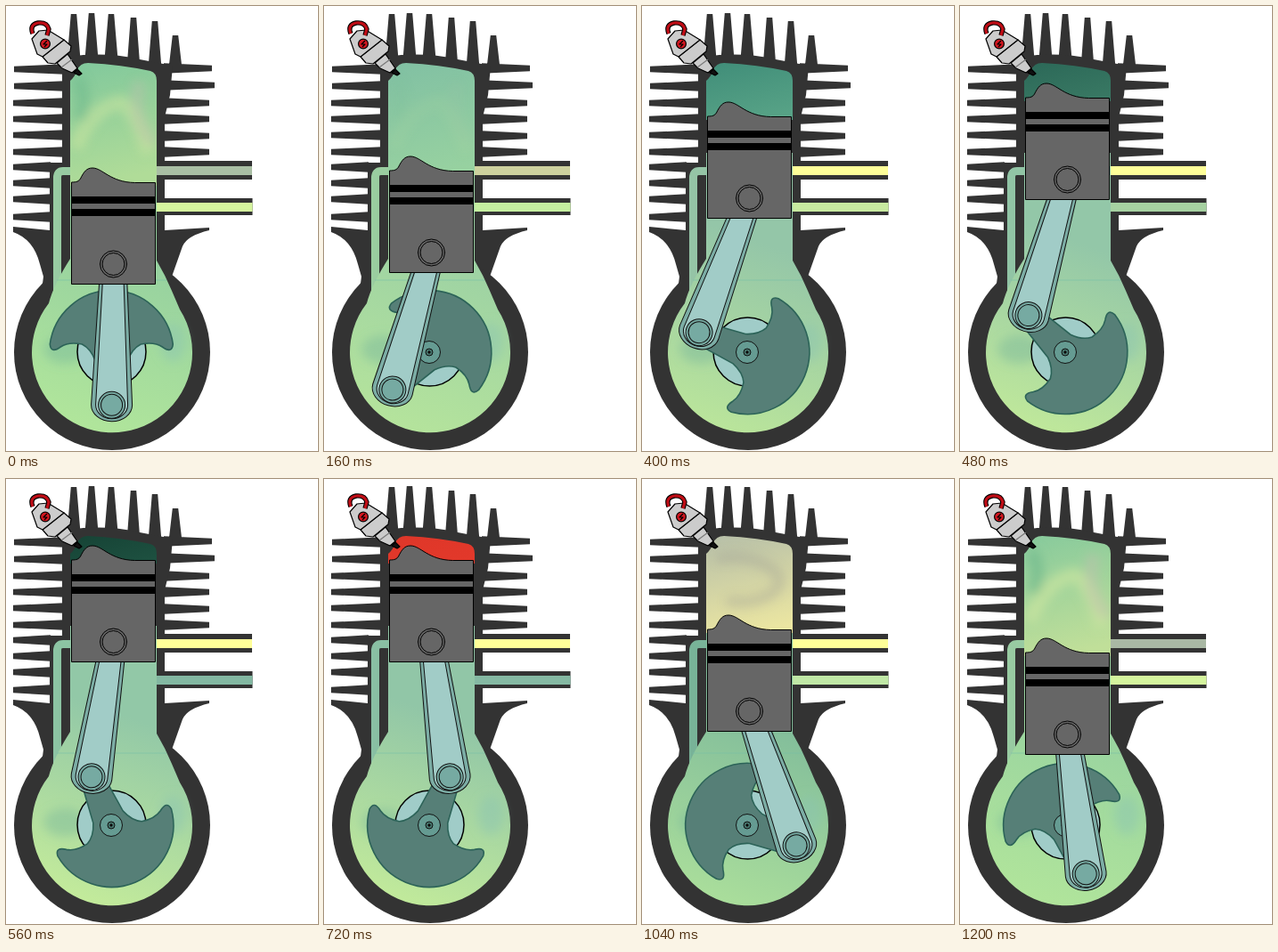
An HTML page that plays this animation: 350 by 500 pixels, repeating every 1280 ms.

```html
<!DOCTYPE html>
<html lang="en">
<head>
<meta charset="utf-8">
<title>Two-stroke engine</title>
<style>
html, body { margin: 0; width: 100%; height: 100%; overflow: hidden; background: #fff; }
svg { display: block; width: 350px; height: 500px; }
</style>
</head>
<body>
<svg viewBox="0 0 350 500" xmlns="http://www.w3.org/2000/svg">
  <defs>
    <linearGradient id="chamberFill" gradientUnits="userSpaceOnUse" x1="95" y1="65" x2="125" y2="195">
      <stop/><stop offset="1"/>
    </linearGradient>
    <linearGradient id="caseFill" gradientUnits="userSpaceOnUse" x1="145" y1="270" x2="75" y2="465">
      <stop/><stop offset="1"/>
    </linearGradient>
    <filter id="soft" x="-50%" y="-50%" width="200%" height="200%"><feGaussianBlur stdDeviation="6"/></filter>
    <clipPath id="chamberClip"><path id="chamberShape"/></clipPath>
  </defs>

  <g fill="#333">
    <path id="fins"/>
    <path d="M63 66L71 57Q110 51 150 60L187 67L184 100L178 125V252L228 249V252Q203 258 198 270L186 304L190 320H40L42 304L38 290Q31 262 8 254V248L49 252V176H63Z"/>
    <circle cx="119" cy="389" r="110"/>
    <path d="M168 174H276V195H168ZM168 216H276.5V235H168Z"/>
  </g>

  <path id="exhaust" d="M167 180H276V190H167Z"/>
  <path id="intake" d="M167 221H276.5V231H167Z"/>
  <path id="channel" d="M74 185.5H64Q57.5 185.5 57.5 193V320" fill="none" stroke-width="9"/>
  <path fill="url(#caseFill)" d="M72 165H169V286Q179 303 186 320L195 341A90 90 0 1 1 48 334Q53 314 72 284Z"/>
  <path d="M57 308H180" stroke="#76bfa8" opacity=".6"/>
  <g filter="url(#soft)">
    <ellipse cx="66" cy="386" rx="24" ry="16" fill="#65a898" opacity=".32"/>
    <ellipse cx="187" cy="378" rx="14" ry="22" fill="#8bc4b4" opacity=".45"/>
  </g>

  <g clip-path="url(#chamberClip)">
    <rect x="72" y="60" width="98" height="170" fill="url(#chamberFill)"/>
    <g id="wisps" filter="url(#soft)" fill="none">
      <path d="M78 160Q95 115 128 108Q145 115 160 165" stroke="#d0e8a0" stroke-width="16" opacity=".6"/>
      <path d="M150 85Q140 125 165 155" stroke="#c2c0b0" stroke-width="14" opacity=".5"/>
      <path d="M80 82Q92 100 82 128" stroke="#69b68b" stroke-width="14" opacity=".6"/>
    </g>
    <path id="smoke" d="M84 90Q120 82 150 104Q165 128 120 138H95" fill="none" stroke="#9f9f94" stroke-width="11" filter="url(#soft)"/>
  </g>

  <circle cx="118.5" cy="388.5" r="38.5" fill="#a0ccc8" stroke="#000" stroke-width="1.5"/>
  <path id="crank" fill="#567f77" stroke="#2c6358" stroke-width="1.6"
    d="M-14 46L-18 10Q-23 -4 -33 -9Q-48 -12 -57 -6Q-68 2 -69 -9A69.6 69.6 0 0 1 69 -9Q68 2 57 -6Q48 -12 33 -9Q23 -4 18 10L14 46Z"/>
  <g transform="translate(118 389)" stroke="#111">
    <circle r="12.5" fill="#659b92"/>
    <circle r="4" fill="#47776e"/>
    <circle r="1.2" fill="#000"/>
  </g>

  <g id="rod" stroke="#111">
    <path id="rodEdge" fill="#7cada5"/>
    <path id="rodFace" fill="#a1ccc7"/>
    <g id="bigEnd" fill="#76aaa2">
      <circle r="15"/>
      <circle r="12"/>
    </g>
  </g>

  <g id="piston">
    <path fill="#666" stroke="#000" d="M-47 22.5V-92C-41 -92 -39 -93 -37 -96C-33 -104 -30 -108 -23.5 -108C-12 -108 -4 -92 24 -91.5H47V22.5Z"/>
    <path d="M-47 -76H47V-68H-47ZM-47 -62H47V-54H-47Z"/>
    <g fill="#666" stroke="#000">
      <circle r="15"/>
      <circle r="12.5"/>
    </g>
  </g>

  <g stroke="#000" stroke-width="1.2" stroke-linejoin="round">
    <path d="M76 75L80 71L85 76L82 78Z" fill="#111"/>
    <path d="M57 64L69 54L80 70L74 75L63 70Z" fill="#ccc"/>
    <path d="M41 57L65 38L73 45L72 51L55 65L47 64Z" fill="#ccc"/>
    <path d="M29 37L37 28L47 27L65 38L41 57L35 54Z" fill="#ccc"/>
    <path d="M62 69L74 60" stroke="#777"/>
    <g fill="none">
      <path d="M30 31Q26 21 36 19Q46 18 48 26L46 33" stroke-width="5.4"/>
      <path d="M30 31Q26 21 36 19Q46 18 48 26L46 33" stroke="#c00d16" stroke-width="3.2"/>
    </g>
    <circle cx="44" cy="42.5" r="5.4" fill="#d31720"/>
    <path d="M46 39L42 43H46L43 46" fill="none"/>
  </g>
</svg>
<script>
const STEP = 80, COUNT = 16;
const HUB = { x: 118.6, y: 389.3 }, THROW = 59, AXIS = 120.5;
const $ = id => document.getElementById(id);
const set = (id, name, value) => $(id).setAttribute(name, value);

// step, chamber top, chamber bottom, exhaust, intake, case top, case bottom, channel
const gases = [
  [0,  '#83c99c', '#b0dc98', '#a9bea4', '#d5f59e', '#95d0a0', '#b0e59b', '#98cba2'],
  [2,  '#82c1a3', '#98d2a0', '#cdd19e', '#c5eea0', '#9cd1a4', '#b4e39c', '#9acda0'],
  [5,  '#428f7a', '#6ab491', '#ffff99', '#c8eaa0', '#94c6a8', '#b9e49b', '#95c4a6'],
  [7,  '#174537', '#2c6a55', '#ffff99', '#83b8a2', '#92c8a7', '#c2ea9b', '#8cc4a3'],
  [8,  '#d53a28', '#e63d2c', '#ffff99', '#83b8a2', '#92c8a7', '#c2ea9b', '#8ac1a3'],
  [11, '#f2302a', '#ee3b32', '#ffff99', '#88bba5', '#90c2a8', '#bce79c', '#87baa4'],
  [13, '#b9c1a8', '#f5eda0', '#ffff99', '#c0e8a6', '#82bd9b', '#a9dd9b', '#78b398'],
  [15, '#8acb9c', '#c0df99', '#a9b8a4', '#d5f59e', '#98d3a0', '#b0e49b', '#98cba2']
];
gases.push([COUNT, ...gases[0].slice(1)]);

function mix(a, b, k) {
  const part = (c, i) => parseInt(c.slice(i, i + 2), 16);
  return `rgb(${[1, 3, 5].map(i => Math.round(part(a, i) + (part(b, i) - part(a, i)) * k))})`;
}

function gasAt(n) {
  const i = gases.findIndex(g => g[0] > n);
  const a = gases[i - 1], b = gases[i], k = (n - a[0]) / (b[0] - a[0]);
  return a.slice(1).map((c, j) => mix(c, b[j + 1], k));
}

function fin(x, y, root, along) {
  const tip = 3.2, base = along === 'x' ? 5.8 : 7.5;
  return along === 'x'
    ? `M${x} ${y - tip}L${root} ${y - base}V${y + base}L${x} ${y + tip}Z`
    : `M${x - tip} ${y}L${x - base} ${root}H${x + base}L${x + tip} ${y}Z`;
}

function drawFins() {
  const left = [71, 90, 109, 127, 145, 164, 181, 199, 217, 237];
  const right = [[231, 70], [234, 89], [228, 109], [228, 127], [228, 146], [228, 164]];
  const top = [[76, 9], [96, 8], [118, 9], [143, 13], [167, 17], [190, 33]];
  set('fins', 'd',
    left.map((y, i) => fin(i < 2 ? 9 : 8, y, i < 6 ? 65 : 50, 'x')).join('') +
    right.map(([x, y]) => fin(x, y, 177, 'x')).join('') +
    top.map(([x, y], i) => fin(x, y, i < 3 ? 60 : 70, 'y')).join(''));
}

function rodPath(length, small, big, depth) {
  return `M${-small} 0L${-big} ${length}A${big} ${depth} 0 0 0 ${big} ${length}L${small} 0Z`;
}

// Slider-crank height on whole pixels, with a little clearance kept at the top.
function pinHeight(a) {
  return Math.round(235.1 + 59.4 * Math.cos(a) - 4.5 * Math.cos(2 * a) + 8 * Math.max(0, -Math.cos(a)) ** 4);
}

function paintGas(n) {
  const [top, bottom, exhaust, intake, caseTop, caseBottom, channel] = gasAt(n);
  const stops = (id, colours) =>
    [...$(id).children].forEach((s, i) => s.setAttribute('stop-color', colours[i]));
  stops('chamberFill', [top, bottom]);
  stops('caseFill', [caseTop, caseBottom]);
  set('exhaust', 'fill', exhaust);
  set('intake', 'fill', intake);
  set('channel', 'stroke', channel);
  const smoke = Math.max(0, 1 - Math.abs(n - 13) / 2);
  set('smoke', 'opacity', 0.4 * smoke);
  set('wisps', 'opacity', (1 - smoke) * Math.max(0, Math.cos((n - 15) * Math.PI / 8)) ** 2);
}

function draw(n) {
  const a = n / COUNT * 2 * Math.PI, deg = n / COUNT * 360;
  const y = pinHeight(a);
  const px = HUB.x - THROW * Math.sin(a), py = HUB.y + THROW * Math.cos(a);
  const length = Math.hypot(px - AXIS, py - y);
  const tilt = Math.atan2(AXIS - px, py - y) * 180 / Math.PI;

  set('crank', 'transform', `translate(118.3 389) rotate(${deg})`);
  set('rod', 'transform', `translate(${AXIS} ${y}) rotate(${tilt})`);
  set('rodEdge', 'd', rodPath(length, 14.5, 23, 18.5));
  set('rodFace', 'd', rodPath(length, 11, 18, 15.5));
  set('bigEnd', 'transform', `translate(0 ${length})`);
  set('piston', 'transform', `translate(${AXIS} ${y})`);
  set('chamberShape', 'd',
    `M72 ${y - 88}V84Q77 80 80 72Q83 64 92 64Q130 66 162 73Q169 75 169 84V${y - 88}Z`);
  paintGas(n);
}

let start = null;
function tick(now) {
  if (start === null) start = now;
  draw(Math.floor((now - start) / STEP) % COUNT);
  requestAnimationFrame(tick);
}

drawFins();
draw(0);
requestAnimationFrame(tick);
</script>
</body>
</html>
```
